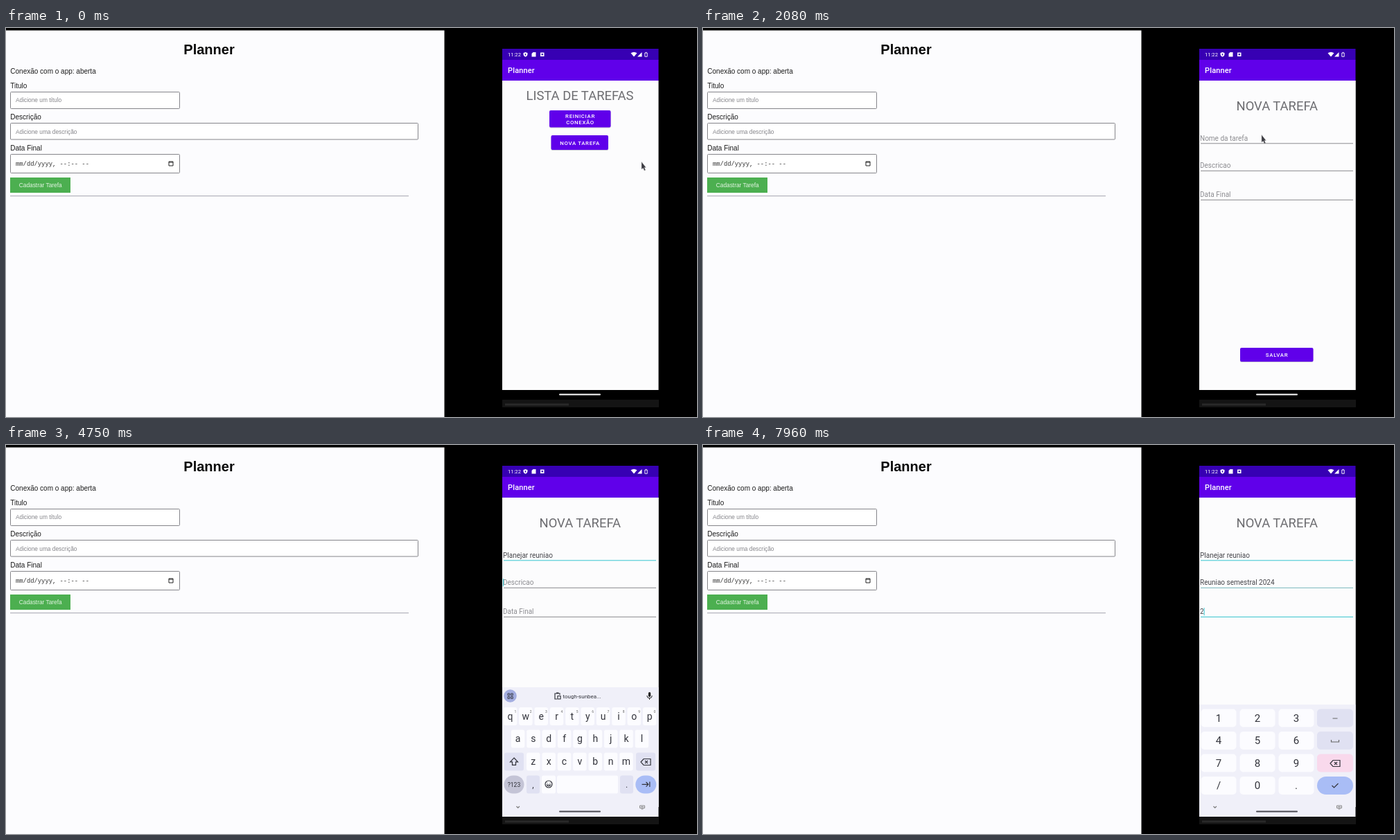
These frames come from a looping animation (997 px wide and 562 px high, 8000 ms). An HTML page:

```html
<!DOCTYPE html>
<html lang="pt">
<head>
<meta charset="utf-8">
<title>Planner</title>
<style>
  html, body { margin: 0; width: 100%; height: 100%; overflow: hidden; background: #000; }
  svg { display: block; width: 997px; height: 562px; }
  text { white-space: pre; }
  .web { font-family: "Liberation Sans", Arial, sans-serif; }
  .mono { font-family: "Liberation Mono", monospace; }
  .app { font-family: Roboto, sans-serif; }
  .caps { font-weight: 500; letter-spacing: .7px; }
</style>
</head>
<body>
<svg viewBox="0 0 997 562" id="stage">
  <defs>
    <clipPath id="screen"><rect x="716" y="30" width="225.5" height="507"/></clipPath>
  </defs>
  <rect width="997" height="562"/>
  <g id="web"></g>
  <g id="phone">
    <rect x="716" y="537" width="226" height="11" fill="#141414"/>
    <rect x="720" y="542.5" width="92" height="3" fill="#292929"/>
    <g clip-path="url(#screen)">
      <rect x="716" y="76" width="226" height="447" fill="#fcfcfd"/>
      <g id="list"></g>
      <g id="form"></g>
      <rect x="716" y="523" width="226" height="14"/>
      <rect x="798" y="528.5" width="60" height="2" rx="1" fill="#fff"/>
      <g id="letters"></g>
      <g id="numbers"></g>
      <rect x="716" y="30" width="226" height="16.5" fill="#3700b3"/>
      <rect x="716" y="46" width="226" height="30" fill="#6000ea"/>
      <g id="bars"></g>
    </g>
    <path id="mouse" d="M0-4.5V6L2.3 4.2 4 8 5.6 7.2 4 3.6H6.3Z" fill="#3b3b42" stroke="#aaa" stroke-width=".4"/>
  </g>
</svg>
<script>
const $ = id => document.getElementById(id);

function add(parent, tag, attrs, content) {
  const el = document.createElementNS("http://www.w3.org/2000/svg", tag);
  for (const k in attrs) el.setAttribute(k, attrs[k]);
  if (content) el.textContent = content;
  return parent.appendChild(el);
}
const box = (p, x, y, width, height, fill, more) =>
  add(p, "rect", { x, y, width, height, fill, ...more });
const text = (p, x, y, s, size, fill, more) =>
  add(p, "text", { x, y, "font-size": size, fill, class: "app", ...more }, s);
const mid = (p, x, y, s, size, fill, more) =>
  text(p, x, y, s, size, fill, { "text-anchor": "middle", ...more });
const icon = (p, d, stroke = "#33343c", more) =>
  add(p, "path", { d, stroke, fill: "none", "stroke-width": 1.2, ...more });

// Web page
const web = $("web"), W = { class: "web" };
box(web, 0, 3.5, 632.5, 559, "#fcfcfe");
mid(web, 293, 38, "Planner", 20, "#080808", { ...W, "font-weight": 700 });
[["Conexão com o app: aberta", 65.5], ["Titulo", 86.5], ["Descrição", 131.5], ["Data Final", 176.5]]
  .forEach(([s, y]) => text(web, 6.3, y, s, 10, "#1c1c1c", W));
[[92.5, 244, 24], [137.5, 588, 23.5], [182.5, 244, 27]].forEach(([y, w, h]) =>
  box(web, 6.5, y, w, h, "#fff", { stroke: "#85858a", rx: 1 }));
text(web, 14, 107.3, "Adicione um título", 8.33, "#85858a", W);
text(web, 14, 152.5, "Adicione uma descrição", 8.33, "#85858a", W);
text(web, 14, 199.3, "mm/dd/yyyy, --:-- --", 8.83, "#333", { class: "mono" });
icon(web, "M235 193h6v6h-6zM235 194h6", "#222", { "stroke-width": 1 });
box(web, 6, 216, 87, 22, "#4caf50");
mid(web, 49.7, 229.7, "Cadastrar Tarefa", 8.33, "#e4f4e4", W);
box(web, 6, 242.2, 575, 1, "#a3a3ad");

// Status and title bars
const bars = $("bars");
text(bars, 724, 41, "11:22", 7.6, "#fff");
add(bars, "path", { fill: "#fff", d: "M749.5 35l3 1v2.3q0 2.2-3 3.4-3-1.2-3-3.4V36zM760.5 35h4v6.4h-6V37zM771 35.5h5.5v5.5H771zM901.5 36.3q4.5-3 9 0L906 41.5zM917.5 35v6.5H911z" });
box(bars, 748.8, 37, 1.4, 2.5, "#3700b3");
box(bars, 772.6, 37, 2.3, 2.3, "#3700b3");
icon(bars, "M921.8 36h3.4v5.3h-3.4zM922.7 35.3h1.6", "#fff", { "stroke-width": .9 });
text(bars, 724, 64.8, "Planner", 11, "#fff", { "font-weight": 500, "letter-spacing": .15 });

// App screens
function button(p, x, y, w, h, lines) {
  box(p, x, y + 1, w, h, "#c9c6d6", { rx: 2 });
  const face = box(p, x, y, w, h, "#6000ea", { rx: 2 });
  lines.forEach(([s, base]) => mid(p, x + w / 2 + .3, base, s, 7.8, "#fff", { class: "app caps" }));
  return face;
}
const list = $("list"), form = $("form");
mid(list, 828, 104.3, "LISTA DE TAREFAS", 18.4, "#6c6c70");
button(list, 784, 119, 88.5, 24.5, [["REINICIAR", 130], ["CONEXÃO", 138.6]]);
const newTask = button(list, 786.5, 155, 82.5, 21, [["NOVA TAREFA", 168.6]]);

box(form, 716, 76, 226, 447, "#fcfcfd");
mid(form, 828.3, 119, "NOVA TAREFA", 18.4, "#6c6c70");
button(form, 775, 462, 105.5, 20, [["SALVAR", 475]]);

// Fields: typing starts at `type`, one character per `step` ms
const TEAL = "#35c5cf", GREY = "#8c8c90";
const fields = [
  { hint: "Nome da tarefa", value: "Planejar reuniao", base: 162.7, focus: 2250, type: 2700, step: 104, blur: 4500, done: TEAL },
  { hint: "Descricao", value: "Reuniao semestral 2024", base: 202.3, focus: 4500, type: 5000, step: 92, blur: 7400, done: "#79b9bd" },
  { hint: "Data Final", value: "2", base: 244.3, focus: 7400, type: 7750, step: 100, blur: 9000, done: TEAL }
];
for (const f of fields) {
  f.label = text(form, 717, f.base, f.hint, 10, GREY);
  f.line = box(form, 718, f.base + 3.6, 220, 1, GREY);
  f.caret = box(form, 717, f.base - 9, 1, 11, TEAL);
}

// Keyboards
const KEY = "#fcfcff", SOFT = "#e0e1f2", BLUE = "#a9bdf6", INK = "#33343c";
const key = (p, cx, cy, w, fill = KEY, rx = 3) =>
  box(p, cx - w / 2, cy - 13, w, 26, fill, { rx });
const backspace = (p, x, y) =>
  icon(p, `M${x - 7} ${y}l4-4.5h10v9h-10zM${x - 1} ${y - 2}l4 4m0-4l-4 4`);

function base(p, y) {
  box(p, 716, y, 226, 537 - y, "#f0f0f9");
  icon(p, "M736.5 522l2.2 2.2 2.2-2.2", "#777");
  box(p, 798, 528.5, 60, 2, "#4a4a52", { rx: 1 });
  icon(p, "M914.5 521h7v3.5h-7zM916 522.7h4M916.5 526h3", "#888", { "stroke-width": 1 });
}

const letters = $("letters"), numbers = $("numbers");
base(letters, 350);
add(letters, "circle", { cx: 727.5, cy: 362.5, r: 9.3, fill: "#a3ade0" });
icon(letters, "M724 359h2.7v2.7H724zM728.6 359h2.7v2.7h-2.7zM724 363.6h2.7v2.7H724zM728.6 363.6h2.7v2.7h-2.7z", INK, { "stroke-width": .9 });
icon(letters, "M799 361v-2h-7v8h3M794 358h3.5M796 362.5h4v4.5h-4z", INK);
text(letters, 803.5, 365.6, "tough-sunbea...", 8, INK);
box(letters, 926.8, 357, 3.4, 7, "#222", { rx: 1.7 });
icon(letters, "M924.8 362q0 3.8 3.7 3.8t3.7-3.8M928.5 365.8v2.2", "#222", { "stroke-width": 1 });

[["qwertyuiop", 727.5, 392], ["asdfghjkl", 738.6, 424.5], ["zxcvbnm", 760.8, 457.5]].forEach(([row, x0, y], r) =>
  [...row].forEach((c, i) => {
    const x = x0 + i * 22.35;
    key(letters, x, y, 19.5);
    mid(letters, x, y + 4.6, c, 14, INK);
    if (!r) mid(letters, x + 7.3, y - 5.5, String((i + 1) % 10), 5, "#666");
  }));
key(letters, 733, 457.5, 28, SOFT);
icon(letters, "M733 452l5.5 5.8h-3v4.5h-5v-4.5h-3z");
key(letters, 923, 457.5, 28, SOFT);
backspace(letters, 923, 458);
key(letters, 733, 490.5, 29, "#c4c4d6", 13);
mid(letters, 733, 493.5, "?123", 8.6, INK);
key(letters, 760.5, 490.5, 19, SOFT);
mid(letters, 760.5, 495, ",", 12, INK);
key(letters, 783, 490.5, 20);
add(letters, "circle", { cx: 783, cy: 490, r: 5, fill: "none", stroke: INK, "stroke-width": 1.2 });
icon(letters, "M780.3 491q2.7 4 5.4 0zM781 488.2v.9M785 488.2v.9");
key(letters, 839, 490.5, 88);
key(letters, 895.5, 490.5, 19, SOFT);
mid(letters, 895.5, 495, ".", 12, INK);
key(letters, 923.3, 490.5, 30, BLUE, 13);
icon(letters, "M917.5 490.3h9M923.5 487l3.3 3.3-3.3 3.3M928.8 486.5v7.6");

base(numbers, 375);
["123", "456", "789", "/0."].forEach((row, r) => {
  const y = 394.5 + r * 32.5;
  [...row].forEach((c, i) => {
    key(numbers, 744 + i * 56, y, 51, KEY, 5);
    mid(numbers, 744 + i * 56, y + 5.2, c, 15, INK);
  });
  key(numbers, 912, y, 52, [SOFT, SOFT, "#f9d9ec", BLUE][r], r == 3 ? 13 : 5);
});
icon(numbers, "M908.5 395h7", "#666");
icon(numbers, "M906.5 426v3h11v-3", "#666");
backspace(numbers, 912, 460);
icon(numbers, "M907.5 492l3 3 6-6");

// Motion
const ramp = (t, a, b) => Math.min(1, Math.max(0, (t - a) / (b - a)));
const ease = k => k * k * (3 - 2 * k);
const show = (el, on) => el.setAttribute("opacity", +on);

const path = [[0, 917, 198], [120, 917, 198], [650, 862, 150], [880, 843, 165], [1650, 843, 165], [2000, 806, 159], [8000, 806, 159]];
function mouseAt(t) {
  const i = path.findIndex((p, n) => n && t <= p[0]);
  const [a, b] = [path[i - 1], path[i]];
  const k = ease(ramp(t, a[0], b[0]));
  return [a[1] + (b[1] - a[1]) * k, a[2] + (b[2] - a[2]) * k];
}

function draw(t) {
  const [x, y] = mouseAt(t);
  $("mouse").setAttribute("transform", `translate(${x} ${y})`);
  show($("mouse"), t < 900 || (t > 1600 && t < 2650));
  newTask.setAttribute("fill", t > 920 ? "#741ff0" : "#6000ea");

  const open = ease(ramp(t, 1250, 1480));
  show(form, open);
  form.setAttribute("transform", `translate(0 ${(1 - open) * 30})`);

  const rise = ease(ramp(t, 2280, 2500));
  letters.setAttribute("transform", `translate(0 ${(1 - rise) * 190})`);
  show(letters, t < 7480);
  show(numbers, t >= 7480);

  for (const f of fields) {
    const count = t < f.type ? 0 : Math.min(f.value.length, 1 + Math.floor((t - f.type) / f.step));
    const s = count ? f.value.slice(0, count) : f.hint;
    if (f.label.textContent !== s) f.label.textContent = s;
    f.label.setAttribute("fill", count ? "#45454a" : GREY);
    const active = t >= f.focus && t < f.blur;
    f.line.setAttribute("fill", t >= f.focus + 350 ? f.done : GREY);
    f.caret.setAttribute("x", 717 + (count ? f.label.getComputedTextLength() : 0));
    show(f.caret, active);
  }
}

const start = performance.now();
(function tick() {
  draw((performance.now() - start) % 8000);
  requestAnimationFrame(tick);
})();
</script>
</body>
</html>
```
